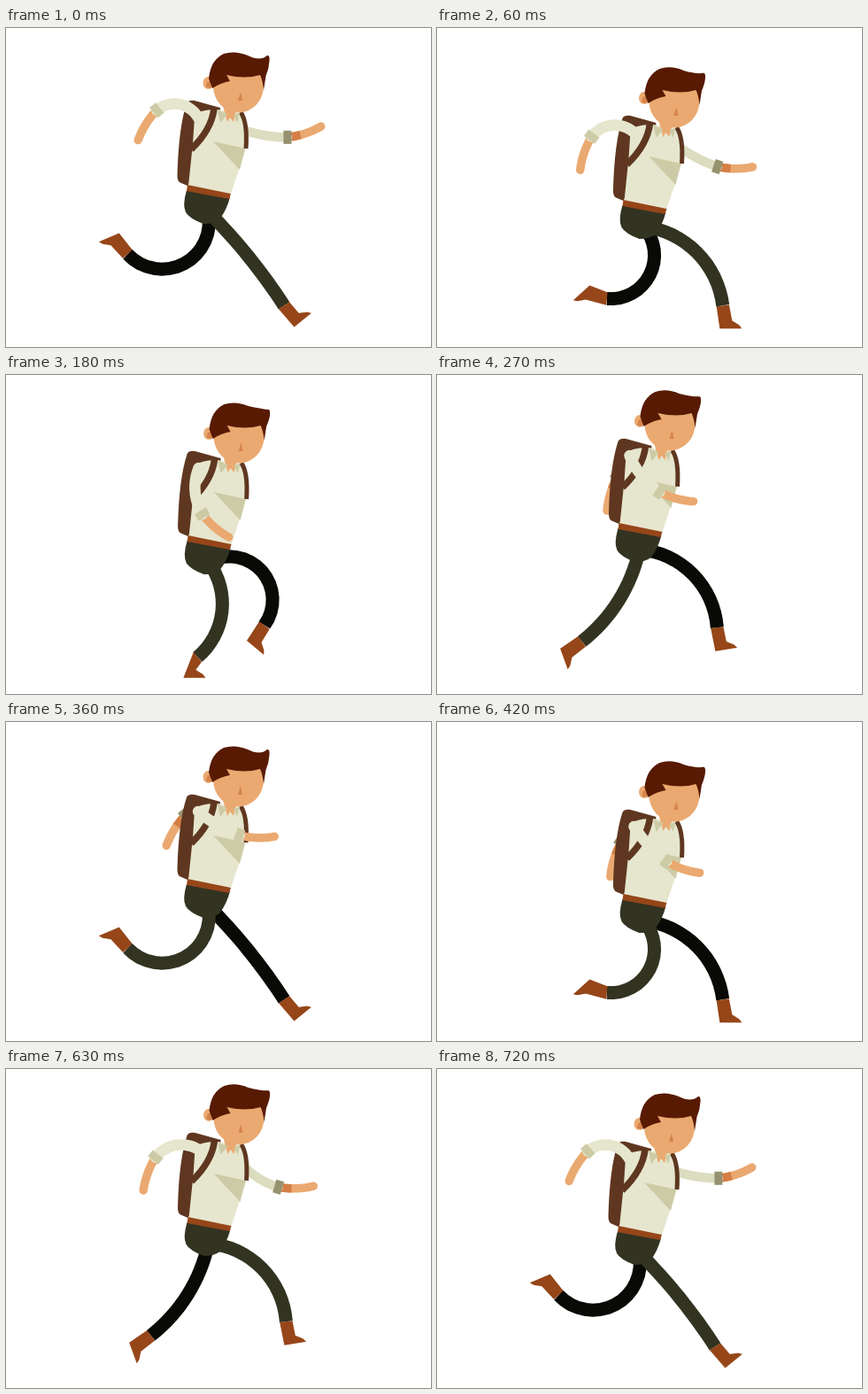
Write an HTML page that moves like this. It is 480 px wide and 360 px high and loops after 750 ms.

```html
<!DOCTYPE html>
<html lang="en">
<head>
<meta charset="utf-8">
<title>Runner</title>
<style>
html, body { margin: 0; width: 100%; height: 100%; overflow: hidden; background: #fff; }
svg { display: block; width: 100vw; height: 100vh; }
.line { fill: none; }
.leg { stroke-width: 15; }
.sleeve { stroke-linecap: round; }
.skin { fill: #eaa970; }
.arm { stroke: #eaa970; stroke-width: 9.5; stroke-linecap: round; }
.shade { fill: #cccba6; }
.tan { fill: #d5844b; }
.pack { fill: #5f3720; }
.strap { stroke: #5f3720; }
.rust { fill: #964619; }
.pants { fill: #333322; }
</style>
</head>
<body>
<svg viewBox="0 0 480 360">
  <g class="body" id="farArm"></g>
  <g class="body" id="farLeg"></g>
  <g class="body">
    <path class="pack" d="M204 85Q206 81 213 82L242 90L240 120L205 178L198 175Q193 174 193.500 165Q195 112 204 85Z"/>
  </g>
  <g class="body" id="nearLeg"></g>
  <g class="body">
    <path class="pants" d="M204 183L253 191Q249 206 241 216Q235 221 223 221Q207 215 203 208Q199 200 204 183Z"/>
    <path fill="#e6e6ce" d="M213 100Q216 92 238 92L266 96Q274 112 273 126L270 139L254 187L206 178L211 130Z"/>
    <path class="rust" d="M205 177L254 187L252 193L204 184Z"/>
    <path class="shade" d="M234 128L270 136L264 160Z"/>
    <path class="line strap" stroke-width="5" d="M265 95Q273 106 271 136"/>
    <path class="line strap" stroke-width="7.5" d="M235 91Q232 115 209 137"/>
    <path class="skin" d="M245 88L261 88L259 97L257 106L253 101L250 106Z"/>
    <path class="shade" d="M239 93L242 107L250 97ZM257 98L261 107L264 96Z"/>
    <ellipse class="skin" cx="228.500" cy="62" rx="6" ry="7"/>
    <path class="tan" d="M226 67Q226 59 231 60L232 68Z"/>
    <ellipse class="skin" cx="262.500" cy="65.500" rx="28.500" ry="30"/>
    <path class="tan" d="M265 72L262 82H267Z"/>
    <path id="hair" fill="#581a02"/>
  </g>
  <g class="body" id="nearArm"></g>
</svg>
<script>
const CYCLE = 720, LOOP = 750, STEP = 30;
const { sin, cos, sqrt, PI } = Math;

// Angles in degrees: 0 hangs down, 90 points ahead.
const gait = [ // time, thigh, shin, leg length, sole
  [0, 45, 33, 137, 39],
  [60, 83, 7, 136, 0],
  [180, 37, -50, 119, 0],
  [270, -12, -52, 125, -70],
  [360, 13, -137, 139, -157],
  [420, 41, -95, 117, -138],
  [540, 119, -36, 132, -40]
];
const swing = [ // time, shoulder, elbow
  [0, -150, -50],
  [60, -132, -37],
  [180, -22, 31],
  [360, 50, 70],
  [420, 33, 53],
  [540, -76, -15]
];

// Smooth periodic curve through the key rows.
function sample(keys, time) {
  const n = keys.length, t = time % CYCLE;
  const at = i => {
    const turn = Math.floor(i / n);
    return keys[i - turn * n].map((v, k) => k ? v : v + turn * CYCLE);
  };
  const i = keys.filter(row => row[0] <= t).length - 1;
  const [a, b, c, d] = [at(i - 1), at(i), at(i + 1), at(i + 2)];
  const h = c[0] - b[0], u = (t - b[0]) / h, w = 1 - u;
  return b.slice(1).map((v, k) => {
    const j = k + 1;
    const m = (c[j] - a[j]) / (c[0] - a[0]) * h;
    const q = (d[j] - b[j]) / (d[0] - b[0]) * h;
    return w * w * ((1 + 2 * u) * v + u * m) + u * u * ((1 + 2 * w) * c[j] - w * q);
  });
}

// Moves from p along an angle, then sideways from it.
function move([x, y], angle, along, side = 0) {
  const r = angle * PI / 180;
  return [x + along * sin(r) + side * cos(r), y + along * cos(r) - side * sin(r)];
}

// A limb whose direction turns evenly from one angle to the other.
function noodle(start, from, to, length) {
  const n = 16, points = [start];
  for (let i = 0; i < n; i++) {
    points.push(move(points[i], from + (to - from) * (i + .5) / n, length / n));
  }
  return { d: 'M' + points.join('L'), end: points[n] };
}

const $ = id => document.getElementById(id);

function add(parent, cls, attrs = {}) {
  const el = document.createElementNS('http://www.w3.org/2000/svg', 'path');
  el.setAttribute('class', cls);
  for (const k in attrs) el.setAttribute(k, attrs[k]);
  parent.append(el);
  return d => el.setAttribute('d', d);
}

function makeLeg(id, color) {
  const limb = add($(id), 'line leg', { stroke: color });
  const shoe = add($(id), 'rust');
  return time => {
    const [thigh, shin, length, sole] = sample(gait, time);
    const { d, end } = noodle([228, 207], thigh, shin, length);
    limb(d);
    const heel = move(move(end, (shin + sole) / 2, 26), sole, 0, -5);
    shoe('M' + [
      move(end, shin, 0, -7.2), heel,
      move(heel, sole, 0, 25), move(heel, sole, -4, 22), move(heel, sole, -9, 14),
      move(end, shin, 0, 7.2)
    ].join('L') + 'Z');
  };
}

function makeArm(id, color, width, cuffColor, isFar) {
  const g = $(id);
  const fore = add(g, 'line arm');
  const shadow = isFar && add(g, 'line', { stroke: '#d57f45', 'stroke-width': 9.5, 'stroke-dasharray': '15 999' });
  const sleeve = add(g, 'line sleeve', { stroke: color, 'stroke-width': width });
  const cuff = add(g, 'line', { stroke: cuffColor, 'stroke-width': 15 });
  return time => {
    // The far shoulder turns with the stride and lifts its arm when ahead.
    const ahead = cos(time / CYCLE * 2 * PI);
    const shoulder = isFar ? [257 - 8 * ahead, 114] : [217, 101];
    const lift = isFar ? 10 - 10 * ahead : 0;
    const [upper, elbow] = sample(swing, time).map(v => v + lift);
    const arm = noodle(shoulder, upper, elbow, 54);
    const hand = noodle(arm.end, elbow + 6, elbow + 30, 40).d;
    fore(hand);
    if (shadow) shadow(hand);
    sleeve(arm.d);
    cuff(`M${move(arm.end, elbow, -4.5)}L${move(arm.end, elbow, 4.5)}`);
  };
}

const nearLeg = makeLeg('nearLeg', '#333322');
const farLeg = makeLeg('farLeg', '#090a05');
const nearArm = makeArm('nearArm', '#e6e6ce', 12.5, '#cccba6', false);
const farArm = makeArm('farArm', '#dcdcbf', 10.5, '#96926f', true);
const bodies = document.querySelectorAll('.body');

function draw(time) {
  const p = time / CYCLE * 4 * PI; // one bounce per step
  const x = 2 - .3 * cos(p) + 3.2 * sin(p) - 1.7 * cos(2 * p);
  const y = 3.7 - 2 * cos(p) + 15.5 * sin(p) - 1.7 * cos(2 * p);
  bodies.forEach(g => g.setAttribute('transform', `translate(${x} ${y})`));

  const drop = 4 * sqrt(Math.abs(sin(p / 2)));
  $('hair').setAttribute('d', `M229 57Q231 36 246 29Q259 25 273 31Q287 ${38 - drop} 295 ${31 + drop}`
    + `Q298 ${30 + drop} 297.500 ${37 + drop}Q297 46 293.500 54L291 70Q290 59 287 53Q270 58 249 53L253 60Q242 62 233 68Z`);

  nearLeg(time);
  farLeg(time + CYCLE / 2);
  nearArm(time);
  farArm(time + CYCLE / 2);
}

function tick() {
  draw(Math.floor(performance.now() % LOOP / STEP) * STEP);
  requestAnimationFrame(tick);
}
tick();
</script>
</body>
</html>
```
